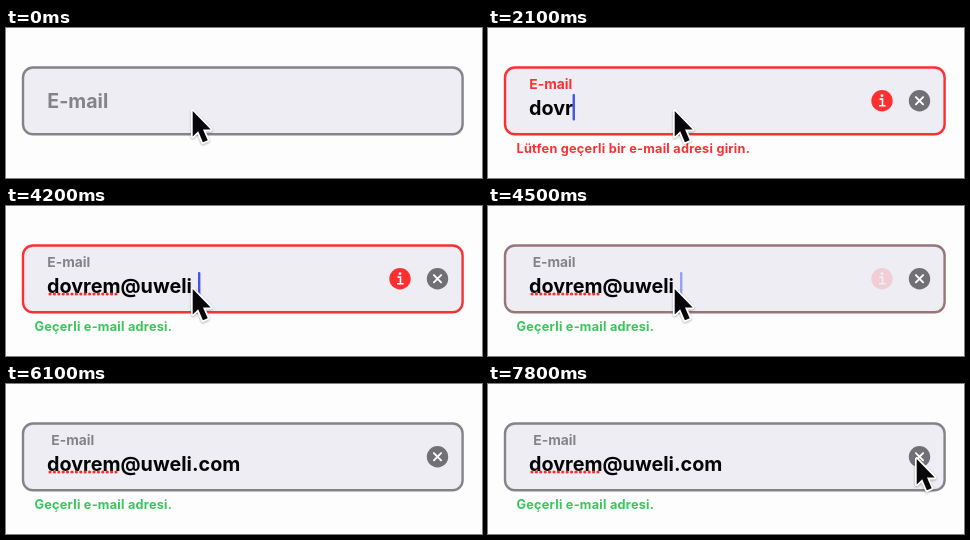
An HTML page that plays this animation: 476 px wide and 150 px high, repeating every 8000 ms.

```html
<!DOCTYPE html>
<html lang="tr">
<head>
<meta charset="utf-8">
<title>E-mail</title>
<style>
  html, body { margin: 0; width: 100%; height: 100%; overflow: hidden; background: #fdfdfd; }
  svg { display: block; }
  text { font-family: Inter, "Liberation Sans", sans-serif; font-weight: 700; }
  #pointer { filter: drop-shadow(0 1px 1px rgba(0, 0, 0, .3)); }
</style>
</head>
<body>
<svg width="476" height="150" viewBox="0 0 476 150">
  <rect id="field" x="17" y="39.5" width="439.6" height="66.8" rx="10" fill="#eeedf4" stroke-width="2.4"/>
  <text id="label">E-mail</text>
  <g id="entry">
    <text id="typed" x="41" y="80.5" font-size="19.8" fill="#050506"></text>
    <line id="spelling" x1="44" y1="82" y2="82" stroke="#f4302f" stroke-width="3.2" stroke-linecap="round" stroke-dasharray="0 4.4"/>
    <rect id="caret" y="60" width="2.4" height="26.5" rx="1" fill="#4355e2"/>
  </g>
  <g id="info" transform="translate(394 72.7)">
    <circle r="10.7" fill="#fc3030"/>
    <path d="M-2.4-1.6H.5V5M-3 5H3.6" fill="none" stroke="#fff" stroke-width="1.6"/>
    <circle cy="-5" r="1.4" fill="#fff"/>
  </g>
  <g id="clear" transform="translate(431.5 72.7)">
    <circle r="10.7" fill="#717074"/>
    <path d="M-3.6-3.6L3.6 3.6M3.6-3.6L-3.6 3.6" stroke="#fff" stroke-width="1.9" stroke-linecap="round"/>
  </g>
  <text id="hint" x="28.5" y="125" font-size="12.7" letter-spacing=".25"></text>
  <path id="pointer" d="M0 0V25.5L5.5 20.3L10.2 31.3L15 29.2L10.3 18.6H18Z" fill="#08080b"
        stroke="#fff" stroke-width="3.6" stroke-linejoin="round" paint-order="stroke"/>
</svg>
<script>
const LOOP = 8000, STEP = 100;
const GRAY = [132, 131, 136], RED = [252, 48, 48];
const START = 1400, SPELLCHECK = 3000, VALID = 4200, BLUR = 6100;
const FOCUS = 400, BLINK = 1000;

// Each burst is typed at an even pace
const BURSTS = [
  { text: 'dovrem', start: START, pace: 200 },
  { text: '@', start: SPELLCHECK, pace: 0 },
  { text: 'uweli', start: 3300, pace: 150 },
  { text: '.', start: VALID, pace: 0 },
  { text: 'com', start: 4800, pace: 150 }
];
const KEYS = BURSTS.flatMap(({ text, start, pace }) =>
  [...text].map((char, i) => ({ char, time: start + i * pace })));

const REST = { x: 186.7, y: 83 };
const MOVES = [
  { start: 5400, length: 500, x: 430, y: -45 },
  { start: 6300, length: 500, x: 391.7, y: 63.5 },
  { start: 7100, length: 700, x: 428.7, y: 75 }
];

const el = id => document.getElementById(id);
const [field, label, entry, typed, spelling, caret, info, clear, hint, pointer] =
  ['field', 'label', 'entry', 'typed', 'spelling', 'caret', 'info', 'clear', 'hint', 'pointer'].map(el);

const set = (node, attrs) => {
  for (const name in attrs) node.setAttribute(name, attrs[name]);
};
const lerp = (a, b, p) => a + (b - a) * p;
const clamp = v => Math.min(1, Math.max(0, v));
const ease = (t, start, length) => {
  const p = clamp((t - start) / length);
  return p * p * (3 - 2 * p);
};
const rgb = c => `rgb(${c.map(Math.round)})`;
const mix = (a, b, p) => rgb(a.map((v, i) => lerp(v, b[i], p)));

// The caret stays solid after a key, then fades out and in once per period
function caretOpacity(t, lastKey) {
  if (t === 0 || t >= BLUR) return 0;
  const phase = (t - lastKey + BLINK) % BLINK;
  return clamp((Math.abs(phase - 450) - 50) / 200);
}

function pointerAt(t) {
  return MOVES.reduce((from, to) => {
    const p = ease(t, to.start, to.length);
    return { x: lerp(from.x, to.x, p), y: lerp(from.y, to.y, p) };
  }, REST);
}

function render(t) {
  const started = t >= START, valid = t >= VALID, checked = t >= SPELLCHECK;
  const lift = started ? lerp(.2, 1, ease(t, START, 400)) : 0;
  const appear = ease(t, START, 500);
  const settle = ease(t, VALID, 400);
  const alert = appear * (1 - settle);

  set(field, { stroke: mix(GRAY, RED, alert) });
  set(label, {
    x: 41.3 + 4 * settle,
    y: lerp(80, 60.5, lift),
    'font-size': lerp(19.6, 13.8, lift),
    fill: rgb(started && !valid ? RED : GRAY)
  });

  const pressed = KEYS.filter(key => key.time <= t);
  const lastKey = pressed.length ? pressed[pressed.length - 1].time : FOCUS;
  typed.textContent = pressed.map(key => key.char).join('');
  set(entry, { transform: `translate(0 ${6 * lift})` });
  set(caret, {
    x: 41 + (started ? typed.getComputedTextLength() - .6 : .4),
    opacity: caretOpacity(t, lastKey)
  });
  set(spelling, {
    x2: checked ? 40 + typed.getSubStringLength(0, BURSTS[0].text.length) : 44,
    opacity: +checked
  });

  set(info, { opacity: alert });
  set(clear, { opacity: appear });
  hint.textContent = valid ? 'Geçerli e-mail adresi.'
    : started ? 'Lütfen geçerli bir e-mail adresi girin.' : '';
  set(hint, { fill: valid ? '#35c759' : rgb(RED) });
  const { x, y } = pointerAt(t);
  set(pointer, { transform: `translate(${x} ${y})` });
}

const origin = performance.now();
function tick() {
  const t = (performance.now() - origin) % LOOP;
  render(Math.floor(t / STEP) * STEP);
  requestAnimationFrame(tick);
}
tick();
</script>
</body>
</html>
```
